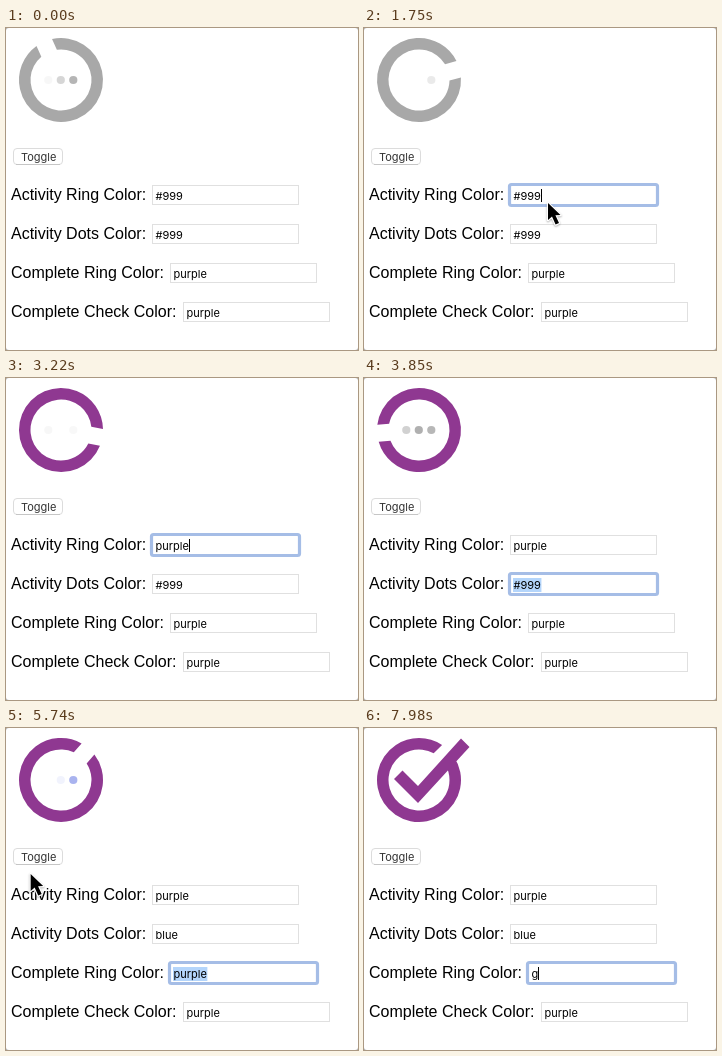
Recreate the animation shown at these times as an HTML page with a canvas. Size 352 by 322 pixels, loop 8 s.

```html
<!DOCTYPE html>
<html lang="en">
<head>
<meta charset="utf-8">
<title>Activity ring</title>
<style>
html, body { margin: 0; width: 100%; height: 100%; overflow: hidden; background: #fff; }
canvas { display: block; width: 352px; height: 322px; }
</style>
</head>
<body>
<canvas id="stage"></canvas>
<script>
const W = 352, H = 322, LOOP = 8000, STEP = 70;
const canvas = document.getElementById('stage');
const ctx = canvas.getContext('2d');
const dpr = window.devicePixelRatio || 1;
canvas.width = W * dpr;
canvas.height = H * dpr;

const GRAY = '#a8a8a8', PURPLE = '#8f3891', BLUE = '#3f55dc';
const LABEL_FONT = '16px "Liberation Sans", Arial, sans-serif';
const FIELD_FONT = '11px Inter, Roboto, sans-serif';
const CX = 55, CY = 52, OUTER = 42, INNER = 30.5, GAP = 8.5;
const SPIN = 0.2622, START = 246, REST = 315;
const CLICK = 5860, FADE = 860;

const rows = [
  { label: 'Activity Ring Color:', x: 146, y: 157 },
  { label: 'Activity Dots Color:', x: 146, y: 196 },
  { label: 'Complete Ring Color:', x: 164, y: 235 },
  { label: 'Complete Check Color:', x: 177, y: 274 }
];

// Pointer stops: time, x, y
const enter = [[280, 176, 285], [840, 178, 184], [1120, 177, 177], [1400, 180, 178], [1680, 184, 175]];
const toggle = [[5600, 0, 186], [5810, 37, 126], [6540, 37, 126], [6720, 186, 268],
  [6790, 209, 277], [7000, 209, 276], [7420, 216, 251], [7700, 221, 249], [7770, 203, 241]];

const clamp = v => Math.max(0, Math.min(1, v));

function along(stops, t) {
  let i = 0;
  while (i < stops.length - 2 && t > stops[i + 1][0]) i++;
  const [t0, x0, y0] = stops[i], [t1, x1, y1] = stops[i + 1];
  const k = clamp((t - t0) / (t1 - t0));
  return [x0 + (x1 - x0) * k, y0 + (y1 - y0) * k];
}

function typed(word, before, start, gap, t) {
  return t < start ? before : word.slice(0, Math.floor((t - start) / gap) + 1);
}

function fieldState(t) {
  const values = [
    typed('purple', '#999', 2660, 112, t),
    typed('blue', '#999', 4270, 95, t),
    t >= 7910 ? 'g' : 'purple',
    'purple'
  ];
  let focus = -1;
  if (t >= 1610 && t < 3500) focus = 0;
  else if (t >= 3500 && t < 4690) focus = 1;
  else if ((t >= 4690 && t < 5880) || t >= 7490) focus = 2;
  const selected = (focus === 0 && t >= 1820 && t < 2660) ||
    (focus === 1 && t < 4270) || (focus === 2 && (t < 5880 || (t >= 7770 && t < 7910)));
  return { values, focus, selected };
}

function ringPath(deg) {
  const a = deg * Math.PI / 180;
  const o = Math.asin(GAP / OUTER), i = Math.asin(GAP / INNER), full = Math.PI * 2;
  const path = new Path2D();
  path.arc(CX, CY, OUTER, a + o, a + full - o);
  path.arc(CX, CY, INNER, a + full - i, a + i, true);
  path.closePath();
  return path;
}

function poly(points, path = new Path2D()) {
  points.forEach(([x, y], i) => i ? path.lineTo(x, y) : path.moveTo(x, y));
  path.closePath();
  return path;
}

const done = ringPath(REST);
poly([[30, 51], [38.5, 42.5], [54, 58], [97, 10.5], [105.5, 19], [54, 75]], done);

const arrow = poly([[0, 0], [0, 17], [4, 13.4], [7.6, 21.6], [11, 20], [7.4, 12.2], [12.5, 12]]);

function dotAlpha(p) {
  p = (p + 1) % 1;
  return Math.min(clamp((p - 0.14) / 0.16), clamp((0.85 - p) / 0.45));
}

function drawActivity(t, fade) {
  const resting = t >= CLICK;
  const angle = resting ? REST : START + SPIN * t;
  const phase = ((angle - REST) % 360 + 360) % 360 / 360;
  ctx.globalAlpha = 1 - fade;
  ctx.fillStyle = t >= 3220 ? PURPLE : GRAY;
  ctx.fill(ringPath(angle));
  ctx.fillStyle = t >= 4555 ? BLUE : GRAY;
  for (let i = 0; i < 3; i++) {
    ctx.globalAlpha = (1 - fade) * (resting ? 1 : dotAlpha(phase - i * 0.17));
    ctx.beginPath();
    ctx.arc(42.3 + i * 12.5, 52, 4.1, 0, 7);
    ctx.fill();
  }
  ctx.globalAlpha = 1;
}

function drawComplete(fade) {
  ctx.globalAlpha = fade;
  ctx.fillStyle = PURPLE;
  ctx.fill(done);
  ctx.globalAlpha = 1;
}

function roundBox(x, y, w, h, r) {
  ctx.beginPath();
  ctx.roundRect(x, y, w, h, r);
}

function drawButton() {
  roundBox(7.5, 120.5, 49, 16, 3.5);
  ctx.fillStyle = '#fff';
  ctx.fill();
  ctx.strokeStyle = '#dcdcdc';
  ctx.lineWidth = 1;
  ctx.stroke();
  ctx.fillStyle = '#c6c6c6';
  ctx.fillRect(10, 136, 44, 1);
  ctx.font = FIELD_FONT;
  ctx.fillStyle = '#333';
  ctx.fillText('Toggle', 15, 133);
}

function drawRow(row, value, focused, selected) {
  const { x, y } = row;
  ctx.font = LABEL_FONT;
  ctx.fillStyle = '#000';
  ctx.fillText(row.label, 5, y + 15);

  ctx.lineWidth = 1;
  ctx.strokeStyle = '#e0e0e0';
  ctx.strokeRect(x + 0.5, y + 0.5, 146, 19);
  if (focused) {
    roundBox(x - 0.5, y - 0.5, 148, 21, 2);
    ctx.lineWidth = 3.2;
    ctx.strokeStyle = '#a5bde6';
    ctx.stroke();
  }
  ctx.font = FIELD_FONT;
  const tx = x + 3.5, width = ctx.measureText(value).width;
  if (selected) {
    ctx.fillStyle = '#b4d5fb';
    ctx.fillRect(x + 3, y + 4, width + 1, 14);
  }
  ctx.fillStyle = '#000';
  ctx.fillText(value, tx, y + 15);
  if (focused && !selected) ctx.fillRect(Math.round(tx + width), y + 4, 1, 13);
}

function drawPointer(t) {
  let pos;
  if (t >= 280 && t < 1820) pos = along(enter, t);
  else if (t >= 5600 && t < 7910) pos = along(toggle, t);
  else return;
  ctx.save();
  ctx.translate(...pos);
  ctx.lineJoin = 'round';
  ctx.lineWidth = 2.4;
  ctx.strokeStyle = '#fff';
  ctx.shadowColor = 'rgba(0,0,0,.3)';
  ctx.shadowBlur = 2 * dpr;
  ctx.shadowOffsetY = dpr;
  ctx.stroke(arrow);
  ctx.shadowColor = 'transparent';
  ctx.fillStyle = '#000';
  ctx.fill(arrow);
  ctx.restore();
}

function draw(t) {
  ctx.setTransform(dpr, 0, 0, dpr, 0, 0);
  ctx.fillStyle = '#b0b0b0';
  ctx.fillRect(0, 0, W, H);
  ctx.fillStyle = '#fff';
  roundBox(0, 0, W, H, 3);
  ctx.fill();

  const fade = clamp((t - CLICK) / FADE);
  if (fade < 1) drawActivity(t, fade);
  if (fade > 0) drawComplete(fade);
  drawButton();
  const { values, focus, selected } = fieldState(t);
  rows.forEach((row, i) => drawRow(row, values[i], i === focus, i === focus && selected));
  drawPointer(t);
}

const begin = performance.now();
function tick() {
  const t = (performance.now() - begin) % LOOP;
  draw(Math.floor(t / STEP) * STEP);
  requestAnimationFrame(tick);
}
tick();
</script>
</body>
</html>
```
